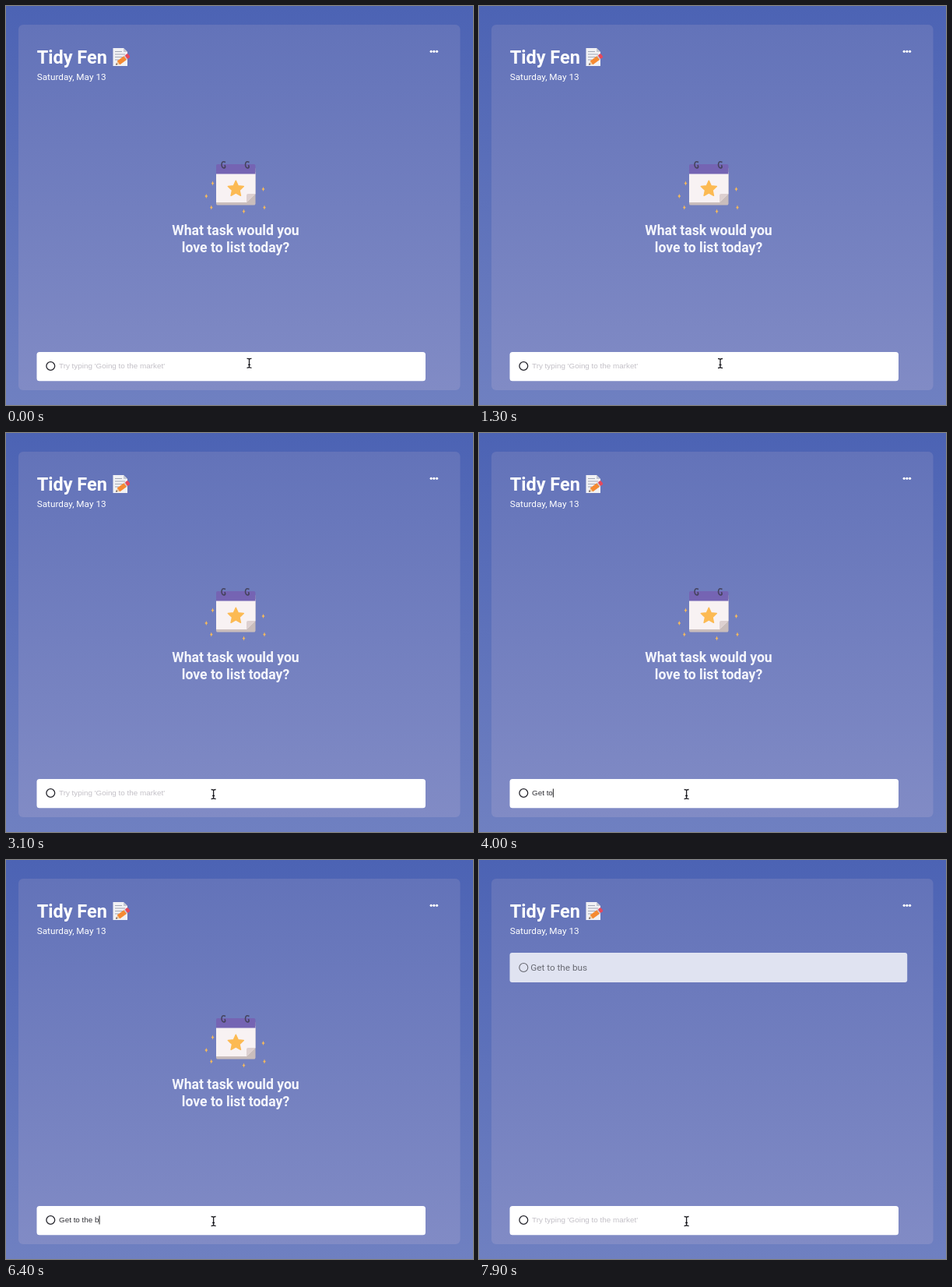
Animation of 600x512 px, one loop 8000 ms. Source, as an HTML page:

```html
<!DOCTYPE html>
<html lang="en">
<head>
<meta charset="utf-8">
<title>Task list</title>
<style>
  html, body { margin: 0; width: 100%; height: 100%; overflow: hidden; }
  svg { display: block; width: 600px; height: 512px; }
  text { font-family: Roboto, sans-serif; fill: #fff; white-space: pre; }
  .title { font-size: 23.5px; font-weight: 700; }
  .small { font-size: 11.75px; }
  .lead { font-size: 17.6px; font-weight: 700; text-anchor: middle; fill: #f5f6fc; }
  .field { font: 9.87px "Liberation Sans", Arial, sans-serif; }
</style>
</head>
<body>
<svg viewBox="0 0 600 512">
  <defs>
    <linearGradient id="sky" x2="0" y2="1">
      <stop stop-color="#4c63b4"/><stop offset="1" stop-color="#6f80c1"/>
    </linearGradient>
    <linearGradient id="panel" x2="0" y2="1">
      <stop stop-color="#6373b9"/><stop offset="1" stop-color="#818bc5"/>
    </linearGradient>
    <path id="spark" d="M0-3Q.5-.5 2 0Q.5.5 0 3Q-.5.5-2 0Q-.5-.5 0-3" fill="#f4b95c"/>
    <path id="ring" d="M2.5-3.5Q-2.5-6-2.5 0Q-2 4 1 4Q3 3 1.5 0" fill="none" stroke="#45435c" stroke-width="1.6"/>
  </defs>

  <rect width="600" height="512" fill="url(#sky)"/>
  <rect x="16" y="24" width="567.5" height="469" rx="6" fill="url(#panel)"/>

  <text class="title" x="39.7" y="74">Tidy Fen</text>
  <text class="small" x="39.7" y="95.3">Saturday, May 13</text>
  <g fill="#fff">
    <circle cx="546.2" cy="58.3" r="1.6"/><circle cx="549.9" cy="58.3" r="1.6"/><circle cx="553.6" cy="58.3" r="1.6"/>
  </g>

  <!-- note with pencil -->
  <path d="M137.5 54H151L156 59V77H137.5Z" fill="#f1f1f4"/>
  <path d="M151 54V59H156Z" fill="#c5c8d2"/>
  <path d="M140 58.5H149M140 62H153M140 65.5H150M140 69H145" stroke="#a3a8b6" stroke-width="1.2"/>
  <g transform="translate(141 75.5) rotate(-36)">
    <path d="M0 0L5-3V3Z" fill="#f0cda4"/>
    <path d="M0 0L2-1.2V1.2Z" fill="#44414a"/>
    <rect x="4.5" y="-3" width="11" height="6" fill="#f58a32"/>
    <rect x="15" y="-3" width="2" height="6" fill="#c9cbd3"/>
    <rect x="16.5" y="-3" width="4.5" height="6" rx="1.5" fill="#e5485c"/>
  </g>

  <g id="empty">
    <rect x="270" y="207" width="50.5" height="48.5" rx="2" fill="#c9bdbc"/>
    <path d="M270 213H320.5V241L309 252H270Z" fill="#f8f2f3"/>
    <path d="M320.5 241H311Q309 241 309 243V252Z" fill="#ddd0d0"/>
    <path d="M270 215.5V205Q270 203 272 203H318.5Q320.5 203 320.5 205V215.5Z" fill="#7564b3"/>
    <use href="#ring" x="279.5" y="204"/><use href="#ring" x="310" y="204"/>
    <path id="star" fill="#fcba53" stroke="#fcba53" stroke-width="1.5" stroke-linejoin="round"/>
    <use href="#spark" x="265.5" y="227.5"/><use href="#spark" x="257.3" y="244"/>
    <use href="#spark" x="263.8" y="258.5"/><use href="#spark" x="305.5" y="263.5"/>
    <use href="#spark" x="332" y="258.5"/><use href="#spark" x="330.5" y="235"/>
    <text class="lead" x="295" y="293.5">What task would you</text>
    <text class="lead" x="295" y="315.5">love to list today?</text>
  </g>

  <g id="item">
    <rect x="39.5" y="119" width="510.7" height="38" rx="3" fill="#e0e3f1"/>
    <circle cx="57.3" cy="138" r="5.5" fill="none" stroke="#65666f" stroke-width="1.1"/>
    <text class="small" x="66.2" y="142.2" style="fill:#686a73">Get to the bus</text>
  </g>

  <rect x="39.5" y="444" width="499.5" height="37.3" rx="3.5" fill="#fff"/>
  <circle cx="57.3" cy="462" r="5.4" fill="none" stroke="#25252c" stroke-width="1.3"/>
  <text id="field" class="field" x="68" y="465.4"></text>
  <rect id="caret" y="456.5" width="1" height="11" fill="#222"/>

  <path id="beam" d="M-3-6Q0-6 0-4.5Q0-6 3-6M0-5V5M-3 6Q0 6 0 4.5Q0 6 3 6M-1.5 2H1.5"
    fill="none" stroke="#1d1d22" stroke-width="1.3"/>
  <path id="arrow" d="M0 0V11.2L2.6 8.8L4.5 13L6.4 12.1L4.6 8H8Z" transform="translate(310.3 456.8)"
    fill="#fff" stroke="#25252b" stroke-width="1.1" stroke-linejoin="round"/>
</svg>
<script>
const $ = id => document.getElementById(id);
const LOOP = 8000, DONE = 7900;

// [time, typed text, caret visible]
const typing = [
  [0, "", 0], [2300, "", 1], [2800, "", 0], [3200, "", 1],
  [3400, "G", 1], [3500, "Ge", 1], [3600, "Get", 1], [3700, "Get ", 1],
  [3900, "Get t", 1], [4000, "Get to", 1], [4500, "Get to ", 1],
  [4700, "Get to b", 1], [5300, "Get to ", 0],
  [5700, "Get to t", 1], [5800, "Get to th", 1], [5900, "Get to the", 1],
  [6000, "Get to the ", 1], [6400, "Get to the b", 1], [6700, "Get to the bu", 1],
  [7200, "Get to the bus", 1], [7700, "Get to the bus", 0], [7800, "Get to the bus", 1],
  [DONE, "", 0]
];
// [time, x, y] of the text pointer
const moves = [[0, 312.5, 458.3], [1300, 310, 458.5], [1900, 283.8, 461], [2100, 269, 463], [2400, 266.6, 463.5], [LOOP, 266.6, 463.5]];

const show = (id, on) => $(id).style.display = on ? "" : "none";

function pointer(t) {
  const i = moves.findIndex(m => m[0] > t), [t0, x0, y0] = moves[i - 1], [t1, x1, y1] = moves[i];
  const k = (t - t0) / (t1 - t0);
  return [x0 + (x1 - x0) * k, y0 + (y1 - y0) * k];
}

function draw(now) {
  const t = Math.floor(now % LOOP / 100) * 100;
  const [, text, caret] = typing.findLast(s => s[0] <= t);
  const field = $("field");
  field.textContent = text || "Try typing 'Going to the market'";
  field.style.fill = text ? "#303036" : "#c3c0c7";
  $("caret").setAttribute("x", 68 + (text ? field.getComputedTextLength() : 0));
  show("caret", caret);
  show("empty", t < DONE);
  show("item", t >= DONE);

  const arrow = t >= 100 && t < 1300;
  show("arrow", arrow);
  show("beam", !arrow);
  $("beam").setAttribute("transform", `translate(${pointer(t)})`);
  requestAnimationFrame(draw);
}

$("star").setAttribute("d", "M" + Array.from({ length: 10 }, (_, i) => {
  const r = i % 2 ? 5 : 10.5, a = i * Math.PI / 5;
  return [295.3 + r * Math.sin(a), 234.8 - r * Math.cos(a)];
}).join("L") + "Z");
draw(performance.now());
</script>
</body>
</html>
```
